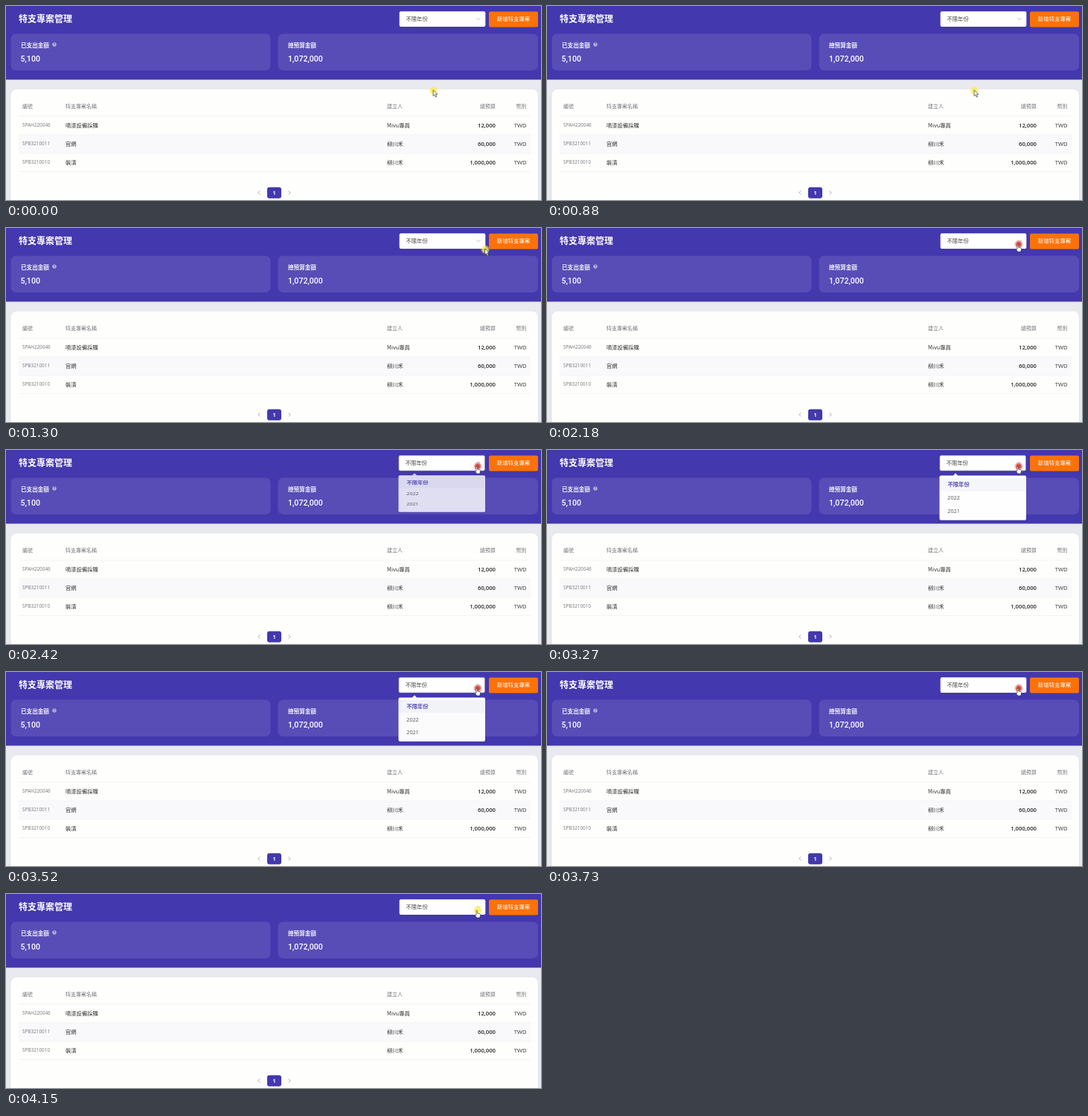
These frames come from a looping animation (719x262 px, 4910 ms). An HTML page:

```html
<!DOCTYPE html>
<html lang="zh-Hant">
<head>
<meta charset="utf-8">
<style>
html, body { margin: 0; width: 100%; height: 100%; overflow: hidden; background: #e9eaf0; }
svg { display: block; width: 719px; height: 262px; }
text { font-family: "Open Sans", "Noto Sans CJK TC", sans-serif; white-space: pre; }
.cjk { font-family: "Noto Sans CJK TC", "Noto Sans CJK", sans-serif; }
.total { font-family: Roboto, sans-serif; }
</style>
</head>
<body>
<svg viewBox="0 0 719 262">
  <defs>
    <filter id="shade" x="-10%" y="-10%" width="120%" height="130%">
      <feDropShadow dx="0" dy="1" stdDeviation="1.5" flood-color="#333" flood-opacity=".08"/>
    </filter>
    <radialGradient id="halo">
      <stop offset=".6" stop-color="#ffec4a" stop-opacity=".8"/>
      <stop offset="1" stop-color="#ffec4a" stop-opacity=".15"/>
    </radialGradient>
    <radialGradient id="ring">
      <stop offset="0" stop-color="#a83c38"/>
      <stop offset=".45" stop-color="#dc5650"/>
      <stop offset=".7" stop-color="#e88f88" stop-opacity=".85"/>
      <stop offset="1" stop-color="#f0b4ae" stop-opacity=".2"/>
    </radialGradient>
  </defs>
  <rect width="719" height="99.500" fill="#4338ad"/>
  <rect x="6.500" y="37.500" width="349" height="49.500" rx="7" fill="#584db7"/>
  <rect x="365.500" y="37.500" width="349.500" height="49.500" rx="7" fill="#584db7"/>
  <circle cx="65" cy="52" r="2.7" fill="#b9b4d8"/>
  <rect x="6.500" y="112.500" width="708.500" height="165" rx="8" fill="#fefefd" filter="url(#shade)"/>
  <rect x="17" y="174" width="688" height="25" fill="#f9f9fb"/>
  <path d="M17 149H705M17 174H705M17 199H705M17 223.500H705" stroke="#f0f0f3" stroke-width=".8"/>
  <rect x="351" y="244.800" width="19" height="15" rx="3" fill="#4338ad"/>
  <path d="M341.300 249.500l-2.500 2.500 2.500 2.500M379.700 249.500l2.500 2.500-2.500 2.500" fill="none" stroke="#a5a5ad" stroke-width=".9"/>
  <rect x="649" y="7.500" width="66" height="21" rx="2" fill="#fb7208"/>
  <g id="labels"></g>

  <g id="select">
    <rect id="field" x="528.700" y="7.300" width="115.600" height="20.700" rx="2" fill="#fefefe" stroke-width=".6"/>
    <path id="chevron" d="M-2.500 -1.200L0 1.300 2.500 -1.200" fill="none" stroke="#b4b7c0" stroke-width=".9"/>
  </g>
  <g id="menu">
    <path d="M545.500 35L549 31.300 552.500 35Z" fill="#fefefe"/>
    <rect x="527.500" y="34.500" width="116.500" height="60.300" rx="2" fill="#fefefe" filter="url(#shade)"/>
    <rect x="528" y="38" width="115.500" height="17.500" fill="#f5f6fa"/>
  </g>

  <g id="pointer">
    <circle id="glow" r="6" fill="url(#halo)"/>
    <circle id="press" r="6" fill="url(#ring)"/>
    <path id="arrow" d="M-.4 -1V7L1.400 5.400 2.800 8.500 4.300 7.800 2.900 4.800H5.400Z" fill="#fff" stroke="#333" stroke-width=".7"/>
    <path id="hand" d="M-2 .8Q-2 0-1.300 0T-.6 .8V4L2.700 4.800Q3.700 5.100 3.500 6.200L2.700 10H-1.200L-3.600 6.800Q-3.500 5.700-2 6.500Z" fill="#fff" stroke="#333" stroke-width=".6"/>
  </g>
</svg>
<script>
const LOOP = 4910, OPEN = 2333, CLOSE = 3520, ZOOM = 300;
const $ = id => document.getElementById(id);
const clamp = v => Math.max(0, Math.min(1, v));
const easeOut = p => 1 - (1 - clamp(p)) ** 5;

// Adds text whose vertical centre is y.
function label(str, x, y, size, fill, { weight = 400, anchor = "start", parent = "labels", style = "" } = {}) {
  const el = document.createElementNS("http://www.w3.org/2000/svg", "text");
  const attrs = { x, y: y + size * .37, "font-size": size, fill, "font-weight": weight, "text-anchor": anchor };
  for (const key in attrs) el.setAttribute(key, attrs[key]);
  el.setAttribute("class", /[\u4e00-\u9fff]/.test(str) ? "cjk" : style);
  el.textContent = str;
  $(parent).append(el);
}

const total = { weight: 500, style: "total" };
label("特支專案管理", 17, 17.4, 12, "#fff", { weight: 700 });
label("已支出金額", 20, 52.7, 7.6, "#f1f0fa", { weight: 700 });
label("5,100", 19.5, 71, 10.6, "#fff", total);
label("總預算金額", 379, 52.7, 7.6, "#f1f0fa", { weight: 700 });
label("1,072,000", 379, 70.8, 10.6, "#fff", total);
label("?", 65, 52, 4.5, "#584db7", { weight: 700, anchor: "middle" });
label("新增特支專案", 682, 17.3, 7.4, "#fff", { anchor: "middle" });
label("1", 360.5, 252.2, 7, "#fff", { weight: 700, anchor: "middle" });

const columns = [22, 80, 512, 658, 699.5];
const heads = ["編號", "特支專案名稱", "建立人", "總預算", "幣別"];
const rows = [
  ["SPAH220046", "噴漆設備採購", "Mivu專員", "12,000", "TWD"],
  ["SPB3210011", "官網", "柳川禾", "60,000", "TWD"],
  ["SPB3210010", "裝潢", "柳川禾", "1,000,000", "TWD"]
];
const sizes = [6.4, 7.3, 7.3, 7.7, 7.6];
const inks = ["#77777c", "#333", "#333", "#222", "#333"];
columns.forEach((x, c) => {
  const anchor = c > 2 ? "end" : "start";
  label(heads[c], x, 135.7, 7, "#77777c", { anchor });
  rows.forEach((row, r) => label(row[c], x, 161 + r * 25, sizes[c], inks[c], { anchor, weight: c == 3 ? 600 : 400 }));
});

label("不限年份", 537.5, 17.2, 7.3, "#444", { parent: "select" });
label("不限年份", 538.5, 46.3, 7.3, "#554bb5", { weight: 700, parent: "menu" });
label("2022", 538.3, 64.5, 7.2, "#555", { parent: "menu" });
label("2021", 538.3, 82, 7.2, "#555", { parent: "menu" });

// Pointer stops: time, x, y
const path = [
  [880, 574.5, 114.5], [1180, 650, 25], [1300, 644, 29],
  [1390, 643, 28], [1420, 643, 28], [1520, 637, 24]
];
function pointerAt(t) {
  if (t >= 1850) return [634, 22];
  if (t <= path[0][0]) return path[0].slice(1);
  const i = path.findIndex(p => p[0] > t);
  if (i < 0) return path.at(-1).slice(1);
  const [t0, x0, y0] = path[i - 1], [t1, x1, y1] = path[i];
  const p = (t - t0) / (t1 - t0), k = p * p * (3 - 2 * p);
  return [x0 + (x1 - x0) * k, y0 + (y1 - y0) * k];
}

const pulse = (t, down, fade, end) =>
  t < down ? 0 : Math.min(clamp((t - down) / 60 + .5), clamp((end - t) / (end - fade)));

function draw(now) {
  const t = now % LOOP;
  const shown = t < CLOSE ? easeOut((t - OPEN) / ZOOM) : 1 - easeOut((t - CLOSE) / ZOOM);
  const focused = t >= OPEN && t < CLOSE + 180;

  $("menu").setAttribute("transform", `translate(0 32.6) scale(1 ${shown}) translate(0 -32.6)`);
  $("menu").setAttribute("opacity", shown);
  $("select").setAttribute("transform", `translate(${focused ? -.8 : 0} 0)`);
  $("field").setAttribute("stroke", focused ? "#8d89a8" : "none");
  $("chevron").setAttribute("transform", `translate(635 17.3) rotate(${180 * shown})`);

  const [x, y] = pointerAt(t);
  const red = Math.max(pulse(t, 2030, 2580, 2760), pulse(t, 3240, 4030, 4150));
  const onSelect = t >= 1480;
  $("pointer").setAttribute("transform", `translate(${x} ${y})`);
  $("glow").setAttribute("opacity", 1 - red);
  $("press").setAttribute("opacity", red);
  $("arrow").style.display = onSelect ? "none" : "";
  $("hand").style.display = onSelect ? "" : "none";
  requestAnimationFrame(draw);
}
draw(0);
</script>
</body>
</html>
```
